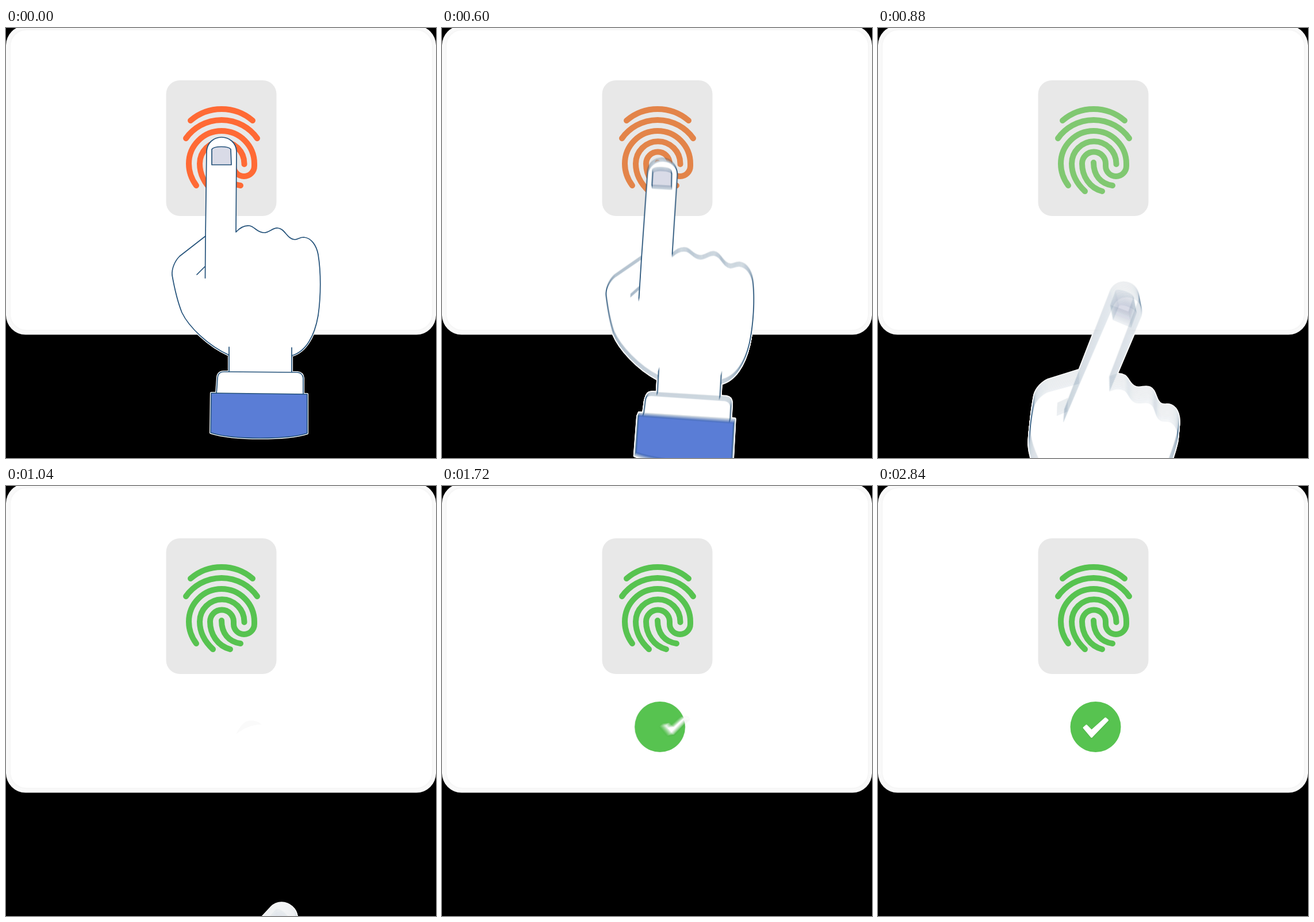
These frames come from a looping animation (748x748 px, 2.96 s). An HTML page with a canvas:

```html
<!DOCTYPE html>
<html lang="en">
<head>
<meta charset="utf-8">
<title>Fingerprint check</title>
<style>
  html, body { margin: 0; width: 100%; height: 100%; overflow: hidden; background: #000; }
  canvas { display: block; width: 748px; height: 748px; }
</style>
</head>
<body>
<canvas id="stage" width="748" height="748"></canvas>
<script>
const SIZE = 748, LOOP = 2960, STEP = 40, SHUTTER = 20, SAMPLES = 20;
const INK = '#24527a', GREEN = '#57c350';

const context = canvas => {
  canvas.width = canvas.height = SIZE;
  return canvas.getContext('2d');
};
const out = context(document.getElementById('stage'));
const back = context(document.createElement('canvas'));
const layer = context(document.createElement('canvas'));

const ridges = new Path2D(`
  M321 161 A82.9 82.9 0 0 1 429 161
  M313 192 A76 76 0 0 1 437 192
  M331 274 C322 262 318 249 318 236 A57 57 0 0 1 432 236 V240
  A18 18 0 0 1 396 240 V236 A20.5 20.5 0 0 0 355 236 C355 258 368 278 390 284
  M360 284 C345 270 337 254 337 236 A38.75 38.75 0 0 1 414.5 236 V237
  M375 234 C375 256 387 271 408 274`);

const palm = new Path2D(`
  M349 214 C350 200 361 190 375 190 C389 190 400 200 401 214 L400 355
  C408 346 416 343 424 344 C433 346 437 356 449 356 C458 356 464 347 473 348
  C485 349 489 367 502 368 C508 368 510 364 518 364 C531 365 540 378 543 394
  C548 425 548 465 543 500 C537 535 522 563 497 570 V600 H388 V569
  C352 553 318 520 306 495 C300 480 294 458 289 430 C288 418 294 405 302 397
  L347 362 Z`);
const creases = new Path2D('M347 362 L346.5 435 M332 429 L346 415 M388 555 V569 M497 556 V570');
const nail = new Path2D('M358 238 V211 C362 205 387 205 391 211 L392 238 Z');
const cuff = new Path2D('M366 637 L368 608 Q369 598 379 598 L507 599 Q516 600 517 609 V638 Z');
const sleeve = new Path2D('M357 635 L524 637 V705 C490 716 396 717 356 704 Z');
const tick = new Path2D('M358 420.5 L362.5 416.5 L371.5 425.5 L395.5 404 L399.5 407.5 L371.5 436.5 Z');
const ghost = new Path2D('M400 432 C408 416 415 408 426 408 C434 408 440 410 444 415 C428 415 414 421 400 432 Z');

// Print colour: time, r, g, b
const tints = [
  [520, 255, 106, 53], [720, 184, 170, 104], [880, 128, 200, 113], [1000, 87, 195, 80]
];
function tint(t) {
  const last = tints.length - 1;
  t = Math.min(Math.max(t, tints[0][0]), tints[last][0]);
  let i = 0;
  while (i < last - 1 && t > tints[i + 1][0]) i++;
  const [a, b] = [tints[i], tints[i + 1]];
  const k = (t - a[0]) / (b[0] - a[0]);
  return `rgb(${[1, 2, 3].map(c => Math.round(a[c] + (b[c] - a[c]) * k))})`;
}

// Linear rise to 1 at `hit`, then a damped 3 Hz swing
function spring(t, hit, rise, amp, decay) {
  const d = t - hit;
  if (d < 0) return Math.max(0, 1 + d / rise);
  return 1 + amp * Math.sin(d * Math.PI * 6 / 1000) * Math.exp(-decay * d);
}

function box(g, x, y, w, h, r, fill) {
  g.fillStyle = fill;
  g.beginPath();
  g.roundRect(x, y, w, h, r);
  g.fill();
}

function shape(g, path, fill) {
  g.fillStyle = fill;
  g.fill(path);
  g.stroke(path);
}

const handOn = t => t < 1080;

function poseHand(g, t) {
  const k = Math.pow(Math.max(0, t - 280) / 600, 3);
  g.translate(400 + 2.6 * k, 355 + 264 * k);
  g.rotate(21.5 * k * Math.PI / 180);
  g.translate(-400, -355);
}

function drawHand(g, t) {
  g.save();
  poseHand(g, t);
  g.strokeStyle = INK;
  g.lineWidth = 1.7;
  g.lineCap = g.lineJoin = 'round';
  shape(g, palm, '#fff');
  g.stroke(creases);
  shape(g, nail, '#d9dbe7');
  shape(g, cuff, '#fff');
  shape(g, sleeve, '#5a7dd6');
  g.restore();
}

// White rim of the hand where it leaves the card
function drawRim(g, times) {
  g.save();
  g.beginPath();
  g.rect(0, 533, SIZE, SIZE);
  g.clip();
  g.strokeStyle = '#fff';
  g.lineWidth = 4.2;
  g.lineJoin = 'round';
  for (const t of times) {
    g.save();
    poseHand(g, t);
    for (const p of [palm, cuff, sleeve]) shape(g, p, '#fff');
    g.restore();
  }
  g.restore();
}

function scaled(g, k, draw) {
  if (k <= 0) return;
  g.save();
  g.translate(755, 375);
  g.scale(k, k);
  g.translate(-755, -375);
  draw();
  g.restore();
}

function drawBadge(g, t) {
  scaled(g, spring(t, 1210, 114, 0.52, 0.008), () => {
    g.fillStyle = GREEN;
    g.beginPath();
    g.arc(378.5, 419, 44, 0, Math.PI * 2);
    g.fill();
  });
  scaled(g, spring(t, 1522, 114, 0.464, 0.0065), () => {
    g.lineWidth = 3;
    g.lineJoin = 'round';
    g.strokeStyle = '#fff';
    g.shadowColor = 'rgba(0,0,0,.16)';
    g.shadowBlur = 2;
    g.shadowOffsetY = 0.6;
    g.stroke(tick);
    g.shadowColor = 'transparent';
    g.fillStyle = '#fff';
    g.fill(tick);
  });
}

function drawBack(g, t, times) {
  g.fillStyle = '#000';
  g.fillRect(0, 0, SIZE, SIZE);
  box(g, 0, -4, 748, 537.5, 34, '#fafafa');
  g.save();
  g.shadowColor = 'rgba(0,0,0,.05)';
  g.shadowBlur = 5;
  box(g, 8, 4, 733, 521, 27, '#fff');
  g.restore();
  box(g, 278.5, 91, 192, 236, 24, '#e8e8e8');
  g.strokeStyle = tint(t);
  g.lineWidth = 10;
  g.lineCap = g.lineJoin = 'round';
  g.stroke(ridges);
  if (t >= 920 && t < 1400) {
    g.fillStyle = '#fafafa';
    g.fill(ghost);
  }
  if (handOn(t)) drawRim(g, times);
}

// Average several moments inside the shutter for motion blur
function render(t) {
  const n = t > 280 && t < 2840 ? SAMPLES : 1;
  const times = Array.from({ length: n }, (_, i) => t + SHUTTER * ((i + 0.5) / n - 0.5));
  drawBack(back, t, times);
  times.forEach((s, i) => {
    layer.drawImage(back.canvas, 0, 0);
    if (handOn(t)) drawHand(layer, s);
    drawBadge(layer, s);
    out.globalAlpha = 1 / (i + 1);
    out.drawImage(layer.canvas, 0, 0);
  });
}

let shown = -1;
function play() {
  const t = Math.floor(performance.now() % LOOP / STEP) * STEP;
  if (t !== shown) render(shown = t);
  requestAnimationFrame(play);
}
play();
</script>
</body>
</html>
```
